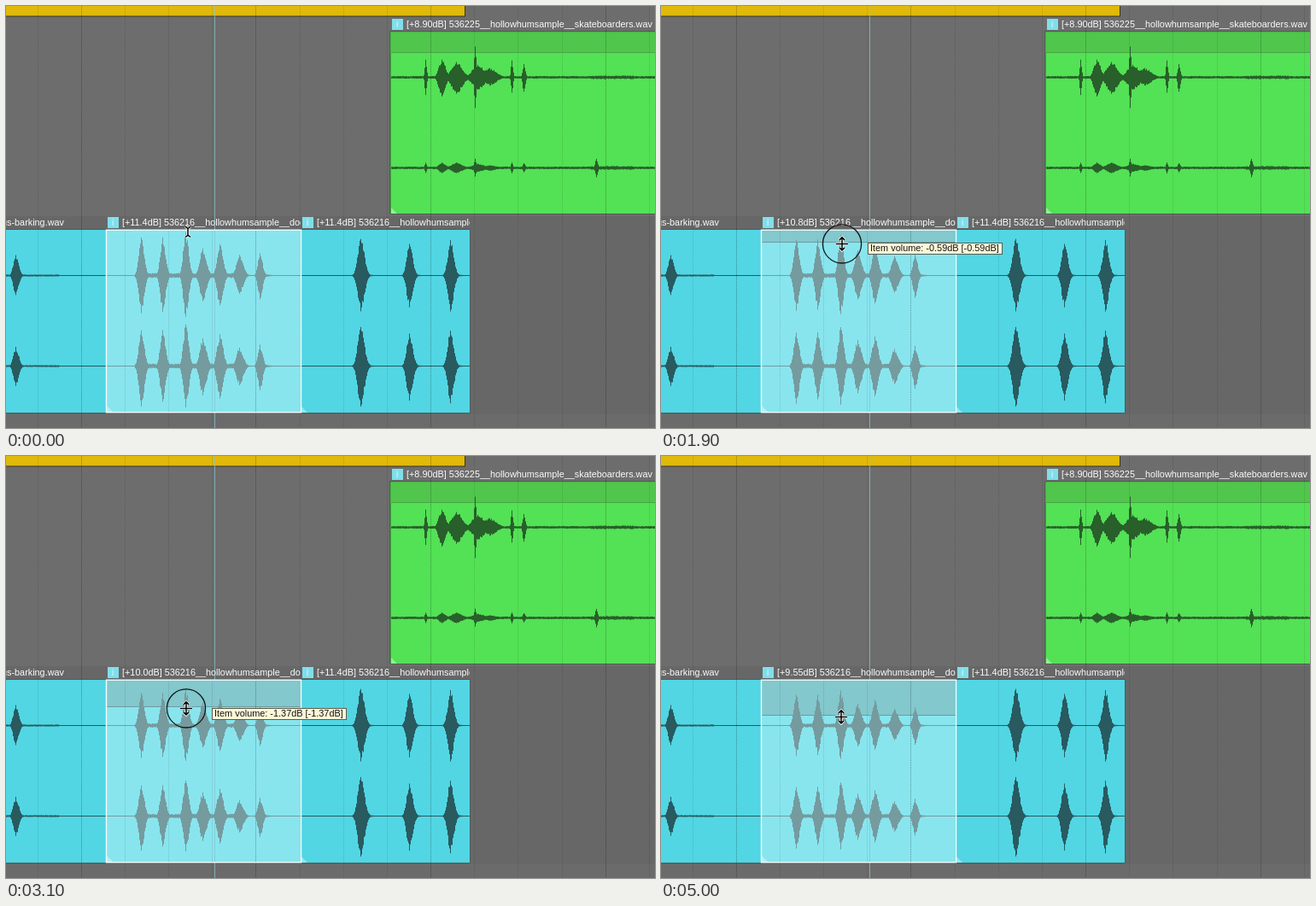
These frames come from a looping animation (760x494 px, 5.1 s). An HTML page with a canvas:

```html
<!DOCTYPE html>
<html lang="en">
<head>
<meta charset="utf-8">
<title>Item volume</title>
<style>
html, body { margin: 0; width: 100%; height: 100%; overflow: hidden; background: #6c6c6c; }
canvas { display: block; }
</style>
</head>
<body>
<canvas id="stage" width="760" height="494"></canvas>
<script>
const ctx = document.getElementById('stage').getContext('2d');
const LOOP = 5100, STEP = 100, TOP = 262, HEIGHT = 213;
const HOVER = 700, PRESS = 1200, RELEASE = 4300;
const NAME = '__hollowhumsample__';
const DARK = '#285a60', PALE = '#759b9f', GREEN = '#285f2a', WHITE = '#fbfbfb';

// time and pixels dragged
const drags = [[0, 0], [1300, 0], [1500, 4], [1900, 14], [2400, 21], [2900, 25], [3400, 41], [LOOP, 41]];

// each burst: x, amplitude, half width
const farBark = [[11, 24, 4]];
const barks = [[158, 49, 4], [183, 49, 4], [210, 53, 4], [230, 35, 5], [250, 38, 4.5], [273, 25, 5], [297, 29, 3.5]];
const lateBarks = [[415, 48, 5], [472, 42, 4.5], [520, 48, 4.5]];
const skate = [[491, 21, 1.5], [510, 23, 5], [527, 21, 8], [549, 36, 1.5], [552, 16, 9], [566, 11, 9], [592, 21, 1.5], [606, 18, 2]];
const skateRight = [...skate.map(([x, a, w]) => [x, a * 0.32, w]), [691, 12, 2]];

const noise = n => { const s = Math.sin(n * 127.1) * 43758.5453; return s - Math.floor(s); };

function rect(x, y, w, h, color) {
  ctx.fillStyle = color;
  ctx.fillRect(x, y, w, h);
}

function text(str, x, y, color, size = 10.85) {
  ctx.font = size + 'px "Liberation Sans", Arial, sans-serif';
  ctx.fillStyle = color;
  ctx.fillText(str, x, y);
}

function label(str, x, y, end) {
  ctx.save();
  ctx.beginPath();
  ctx.rect(x - 18, y - 12, end - x + 18, 16);
  ctx.clip();
  rect(x - 17, y - 10, 13, 13, '#80deeb');
  text('i', x - 12, y, '#e4fbff', 10);
  text(str, x, y, WHITE);
  ctx.restore();
}

// one side of the wave: steep rise, slower fall and a short tail
function level(bursts, x, seed, floor, tail) {
  const rough = noise(x * 1.3 + seed);
  let v = floor * (0.6 + 0.4 * rough);
  for (const [c, amp, w] of bursts) {
    const d = x - c, peak = amp * (0.85 + 0.15 * noise(c + seed));
    const jag = d ? 1 - 0.22 * rough : 1;
    v = Math.max(v, peak * jag * Math.exp(-((d / (d < 0 ? w : w * 1.2)) ** 2)));
    if (d > 0) v = Math.max(v, peak * tail * Math.exp(-d / 8));
  }
  return v;
}

function wave(bursts, x0, x1, mid, color, gain = 1, floor = () => 0, tail = 0.08) {
  rect(x0, mid - 0.5, x1 - x0, 1, color);
  for (let x = x0; x < x1; x++) {
    const up = level(bursts, x, mid, floor(x), tail) * gain;
    const down = level(bursts, x, mid + 50, floor(x), tail) * gain;
    if (up + down > 0.8) ctx.fillRect(x, mid - up, 1, up + down);
  }
}

function stereo(...args) {
  wave(...args);
  args[3] += 106;
  wave(...args);
}

function corner(x, y) {
  ctx.fillStyle = 'rgba(255,255,255,.4)';
  ctx.beginPath();
  ctx.moveTo(x, y - 7);
  ctx.lineTo(x + 7, y);
  ctx.lineTo(x, y);
  ctx.fill();
}

function grid() {
  ctx.save();
  ctx.setLineDash([1, 1]);
  ctx.lineWidth = 1;
  for (let i = 0; i < 15; i++) {
    const x = Math.floor(37.1 + i * 51.17) + 0.5;
    ctx.strokeStyle = `rgba(0,0,0,${i % 4 === 1 ? 0.34 : 0.15})`;
    ctx.beginPath();
    ctx.moveTo(x, 0);
    ctx.lineTo(x, 494);
    ctx.stroke();
  }
  ctx.restore();
}

function pointer(x, y, resize) {
  const reach = resize ? 7.5 : 4, flare = resize ? 4.5 : 6;
  for (const [color, width] of [['#fff', 3.2], ['#000', 1.5]]) {
    ctx.strokeStyle = color;
    ctx.lineWidth = width;
    ctx.beginPath();
    if (resize) { ctx.moveTo(x - 7, y); ctx.lineTo(x + 7, y); }
    ctx.moveTo(x, y - reach); ctx.lineTo(x, y + reach);
    for (const s of [-1, 1]) {
      ctx.moveTo(x - 3, y + s * flare); ctx.lineTo(x, y + s * reach); ctx.lineTo(x + 3, y + s * flare);
    }
    ctx.stroke();
  }
}

function dragAt(t) {
  const i = Math.max(1, drags.findIndex(k => k[0] >= t));
  const [t0, a] = drags[i - 1], [t1, b] = drags[i];
  return Math.round(a + (b - a) * (t - t0) / (t1 - t0));
}

function drawTracks(drag) {
  rect(0, 0, 760, 494, '#6d6d6d');
  rect(0, 246, 760, 232, '#676767');
  rect(0, 478, 760, 16, '#6b6b6b');

  rect(0, 0, 538, 12.5, '#3a3620');
  rect(0, 0, 537, 11.5, '#e0b90a');

  rect(449.5, 29.5, 311, 214, '#2c592c');
  rect(450.5, 30.5, 310, 212.5, '#53e155');
  rect(450.5, 30.5, 310, 23.5, '#50c64c');
  rect(450, 54, 310, 1, '#46a843');
  corner(451, 243);

  rect(0, 261.5, 543.5, 215, '#2e5558');
  rect(0, TOP, 543, 214, '#52d6e3');
  rect(117, TOP, 229, 214, '#88e5ee');
  if (drag) {
    rect(118, TOP, 227, drag, '#82c8cd');
    rect(118, TOP + drag, 227, 1, '#6b9ca0');
  }
  corner(118, 475);
  corner(346, 476);
  grid();
  rect(244, 0, 1, 494, 'rgba(138,194,208,.75)');
}

function drawWaves(gain) {
  const hiss = x => x > 684 && x < 735 ? 2.2 : 1.6;
  wave(skate, 451, 760, 83.5, GREEN, 1, hiss, 0);
  wave(skateRight, 451, 760, 189.5, GREEN, 1, hiss, 0);
  stereo(farBark, 0, 117, 315.5, DARK, 1, x => x < 62 ? 1.2 : 0);
  stereo(barks, 118, 345, 315.5, PALE, gain, x => x > 150 && x < 280 ? 3 : 0, 0.13);
  stereo(lateBarks, 346, 543, 315.5, DARK);
  ctx.strokeStyle = '#f4ffff';
  ctx.lineWidth = 1.4;
  ctx.strokeRect(117.5, 262.2, 228, 213.5);
}

function drawTip(x, drag, dB) {
  const left = Math.min(242, x + 30), top = Math.round(263.2 + drag * 1.02);
  const value = dB.toFixed(2) + 'dB';
  rect(left, top, 158, 14, '#5d5b4c');
  rect(left + 1, top + 1, 156, 12, '#fdf7d8');
  text(`Item volume: ${value} [${value}]`, left + 3, top + 10, '#151515', 10.9);
}

function draw(now) {
  const t = Math.floor(now % LOOP / STEP) * STEP;
  const drag = dragAt(t), gain = 1 - drag / HEIGHT, dB = 20 * Math.log10(gain);
  const x = Math.round(213 - drag / 20), y = 264.4 + drag;

  drawTracks(drag);
  drawWaves(gain);
  label('[+8.90dB] 536225' + NAME + 'skateboarders.wav', 469, 25, 760);
  text('gs-barking.wav', -5, 257, WHITE);
  label(`[+${(11.41 + dB).toPrecision(3)}dB] 536216${NAME}dogs-barking.wav`, 136, 257, 345);
  label(`[+11.4dB] 536216${NAME}dogs-barking.wav`, 364, 257, 543);

  if (t >= PRESS && t < RELEASE) {
    ctx.strokeStyle = '#151515';
    ctx.lineWidth = 1.3;
    ctx.beginPath();
    ctx.arc(x, y, 22.6, 0, 7);
    ctx.stroke();
    if (drag) drawTip(x, drag, dB);
  }
  pointer(x, y, t >= HOVER);
}

const start = performance.now();
function tick() {
  draw(performance.now() - start);
  requestAnimationFrame(tick);
}
tick();
</script>
</body>
</html>
```
